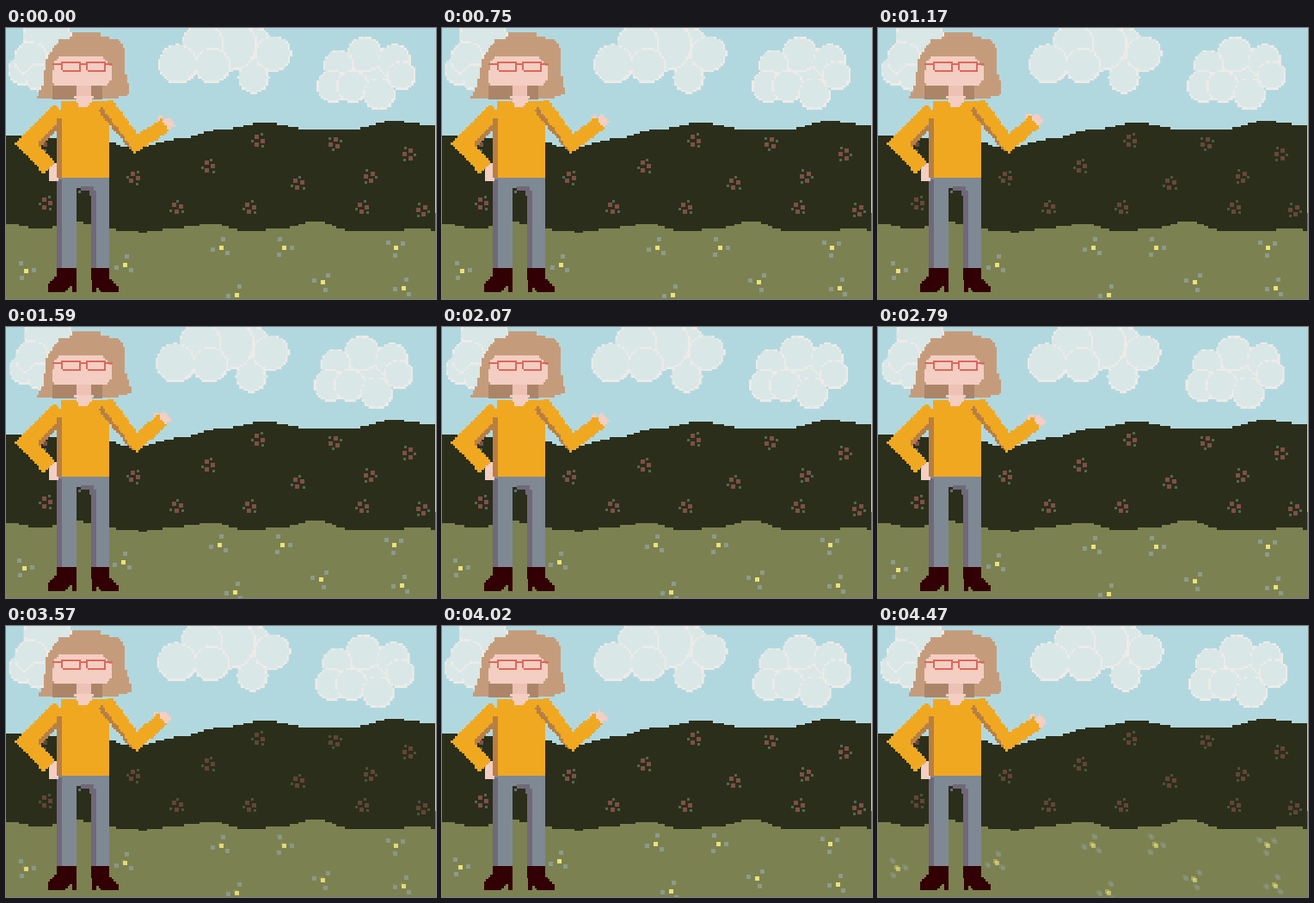
These frames come from a looping animation (500x315 px, 4500 ms). An HTML page with a canvas:

```html
<!DOCTYPE html>
<html lang="en">
<head>
<meta charset="utf-8">
<title>Garden greeting</title>
<style>
html, body { margin: 0; width: 100%; height: 100%; overflow: hidden; background: #b3d8e0; }
canvas { display: block; width: 500px; height: 315px; }
</style>
</head>
<body>
<canvas id="stage" width="500" height="315"></canvas>
<script>
const c = document.getElementById('stage').getContext('2d');
const LOOP = 4500, CELL = 2.56, TAU = 2 * Math.PI;
const skin = '#f4cec2', wool = '#f1a821', woolShade = '#b77f43';
const snap = v => Math.round(Math.round(v / CELL) * CELL);
const ramp = (v, a, b) => Math.max(0, Math.min(1, (v - a) / (b - a)));

function rect(color, x, y, w, h) {
  c.fillStyle = color;
  c.fillRect(x, y, w, h);
}

// Visits every cell row between two heights.
function rows(top, bottom, draw) {
  for (let r = Math.floor(top / CELL); r <= bottom / CELL; r++) {
    const y = Math.round(r * CELL);
    draw((r + 0.5) * CELL, y, Math.round((r + 1) * CELL) - y);
  }
}

// Fills a polygon in blocky cells.
function poly(color, ...pts) {
  const ys = pts.map(p => p[1]);
  rows(Math.min(...ys), Math.max(...ys), (mid, y, h) => {
    const xs = [];
    pts.forEach(([x1, y1], i) => {
      const [x2, y2] = pts[(i + 1) % pts.length];
      if ((y1 > mid) !== (y2 > mid)) xs.push(x1 + (mid - y1) * (x2 - x1) / (y2 - y1));
    });
    xs.sort((a, b) => a - b);
    for (let i = 0; i + 1 < xs.length; i += 2) {
      const x = snap(xs[i]);
      rect(color, x, y, snap(xs[i + 1]) - x, h);
    }
  });
}

function disc(color, cx, cy, r) {
  rows(cy - r, cy + r, (mid, y, h) => {
    const d = r * r - (mid - cy) ** 2;
    if (d <= 0) return;
    const x = snap(cx - Math.sqrt(d));
    rect(color, x, y, snap(cx + Math.sqrt(d)) - x, h);
  });
}

// A straight bar of width w, squared off half a width beyond its far end.
function limb(color, [x1, y1], [x2, y2], w) {
  const len = Math.hypot(x2 - x1, y2 - y1), r = w / 2;
  const ux = (x2 - x1) / len * r, uy = (y2 - y1) / len * r;
  poly(color, [x1 - uy, y1 + ux], [x1 + uy, y1 - ux],
    [x2 + ux + uy, y2 + uy - ux], [x2 + ux - uy, y2 + uy + ux]);
}

function rng(seed) {
  return () => (seed = seed * 16807 % 2147483647) / 2147483647;
}

const clouds = [
  [[48, 10, 28], [20, 49, 18], [29, 36, 20], [38, 57, 16]],
  [[284, 24, 27], [262, 20, 30], [229, 20, 25], [200, 42, 23],
   [240, 44, 21], [288, 58, 18], [311, 30, 21]],
  [[422, 50, 29], [417, 31, 21], [452, 39, 20], [460, 55, 17],
   [387, 43, 18], [380, 68, 19], [403, 68, 19], [434, 77, 19]]
];

function cloud(list, dx) {
  c.save();
  c.translate(dx, 0);
  for (const [x, y, r] of list) {
    disc('#eeebe8', x, y, r);
    disc('#d9e7e7', x - 0.5, y - 0.5, r - 2);
  }
  c.restore();
}

// Smooth curve through heights placed at an even spacing.
function curve(heights, gap) {
  const pts = [];
  for (let x = 0; x <= 500; x += 5) {
    const i = Math.floor(x / gap), f = x / gap - i;
    const a = heights[i], b = heights[i + 1] ?? a;
    pts.push([x, a + (b - a) * (1 - Math.cos(Math.PI * f)) / 2]);
  }
  return pts;
}

const hedge = [
  ...curve([125, 127, 127, 140, 129, 118, 110, 117, 118, 108, 113], 50),
  ...curve([227, 234, 225, 234, 237, 232, 228, 236, 233, 225, 235, 236, 233, 237], 40).reverse()
];

function backdrop(t) {
  rect('#b2d8df', 0, 0, 500, 145);
  const swing = 1 - Math.cos(TAU * t / LOOP);
  clouds.forEach((list, i) => cloud(list, [1, -1.7, -2][i] * swing));
  rect('#7b8151', 0, 215, 500, 100);
  poly('#2b2e1a', ...hedge);
}

const blooms = [
  [294, 131], [382, 134], [468, 147], [236, 161], [149, 174], [423, 173], [340, 181],
  [199, 209], [284, 209], [415, 209], [484, 212], [47, 204], [41, 136]
];
const daisies = [
  [23, 282], [138, 275], [250, 255], [323, 255],
  [453, 255], [368, 295], [268, 310], [462, 302]
];

// Three small squares spread around a centre.
function ring(color, [x, y], radius, size, turn) {
  for (let k = 0; k < 3; k++) {
    const a = turn + k * TAU / 3;
    rect(color, Math.round(x + radius * Math.cos(a) - size / 2),
      Math.round(y + radius * Math.sin(a) - size / 2), size, size);
  }
}

function daisy([x, y], turn, alpha) {
  c.globalAlpha = alpha;
  ring('#8d9b8b', [x, y], 10, 5, turn);
  rect('#ebe17c', x - 2, y - 2, 5, 5);
  c.globalAlpha = 1;
}

function flowers(p) {
  const rand = rng(77);
  const out = 1 - ramp(p, 0.965, 1);
  const dim = Math.sin(Math.PI * ramp(p, 0.47, 0.66) * out);
  const shift = ramp(p, 0.58, 0.67) * out;
  for (const b of blooms) {
    const turn = rand() * TAU;
    c.globalAlpha = 1 - 0.35 * dim;
    ring('#7d5048', b, 5, 5, turn);
    ring('#536854', b, 8, 3, turn + 1);
    c.globalAlpha = 1;
  }
  for (const [x, y] of daisies) {
    const turn = rand() * TAU;
    daisy([x, y], turn, 1 - shift);
    daisy([x - 2, y - 2], turn, shift);
  }
}

function leg(x, w, shadeTop) {
  const boot = '#320004';
  rect('#7f8994', x, 174, w, 105);
  rect('#70687a', x, shadeTop, 6, 279 - shadeTop);
  rect(boot, x, 279, w, 14);
  poly(boot, [x, 290], [x + w, 290], [x + w, 297], [x, 297]);
}

function legs() {
  rect('#7f8994', 79, 174, 22, 12);
  leg(59, 23, 176);
  leg(99, 21, 189);
  poly('#70687a', [82, 197], [88, 184], [101, 184], [105, 197], [99, 197], [96, 189], [89, 189]);
  const boot = '#320004';
  poly(boot, [59, 289], [82, 289], [82, 308], [76, 308], [76, 300], [66, 308], [49, 308], [49, 297]);
  poly(boot, [99, 289], [120, 289], [130, 300], [130, 308], [112, 308], [105, 300], [105, 308], [99, 308]);
}

function torso(p) {
  const elbow = [24, 134];
  rect(skin, 50, 157, 11, 21);
  limb(woolShade, [66, 97], [28, 135], 20);
  limb(wool, [62, 95], elbow, 19);
  limb(wool, [46, 158], elbow, 19);
  limb(wool, elbow, [44, 156], 19);
  rect(wool, 64, 85, 56, 89);
  rect(woolShade, 59, 105, 6, 69);

  const bend = [152, 134];
  const lift = 9 * Math.min(ramp(p, 0, 0.6), ramp(1 - p, 0, 0.15));
  const dir = -(32 + lift) * TAU / 360;
  const along = (d, side = 0) => [
    bend[0] + d * Math.cos(dir) + side * Math.sin(dir),
    bend[1] + d * Math.sin(dir) - side * Math.cos(dir)
  ];
  limb(woolShade, [113, 91], [149, 134], 16);
  limb(wool, [117, 87], bend, 15);
  limb(skin, along(20), along(42), 13);
  limb(skin, along(36, 5), along(38, 9), 6);
  limb(wool, along(34), bend, 17);
  limb(wool, bend, along(31), 17);
}

function head(t) {
  const sway = 2 * Math.sin(TAU * t / 1125);
  poly('#c59c7b',
    [78, 6], [109, 6], [112, 11], [129, 12], [137, 22], [138, 48],
    [144 + sway, 70], [144 + sway, 77], [122, 83], [54, 83], [35 + sway, 83],
    [42 + sway, 67], [47, 36], [62, 14], [77, 11]);
  rect('#ac8569', 54, 67, 58, 16);
  poly(skin, [54, 52], [57, 39], [63, 33], [112, 33], [122, 44],
    [122, 62], [117, 67], [59, 67], [54, 62]);
  rect('#edc2b4', 82, 67, 17, 15);
  poly(skin, [79, 80], [102, 80], [95, 92], [86, 92]);

  const rim = '#dc685c';
  rect(rim, 54, 41, 70, 2);
  for (const x of [64, 93]) {
    rect(rim, x, 39, 23, 12);
    rect(skin, x + 2, 41, 19, 8);
    rect(skin, x, 49, 2, 2);
  }
}

const start = performance.now();
function frame() {
  const t = (performance.now() - start) % LOOP;
  const p = t / (LOOP / 2) % 1;
  backdrop(t);
  flowers(p);
  legs();
  torso(p);
  head(t);
  requestAnimationFrame(frame);
}
frame();
</script>
</body>
</html>
```
